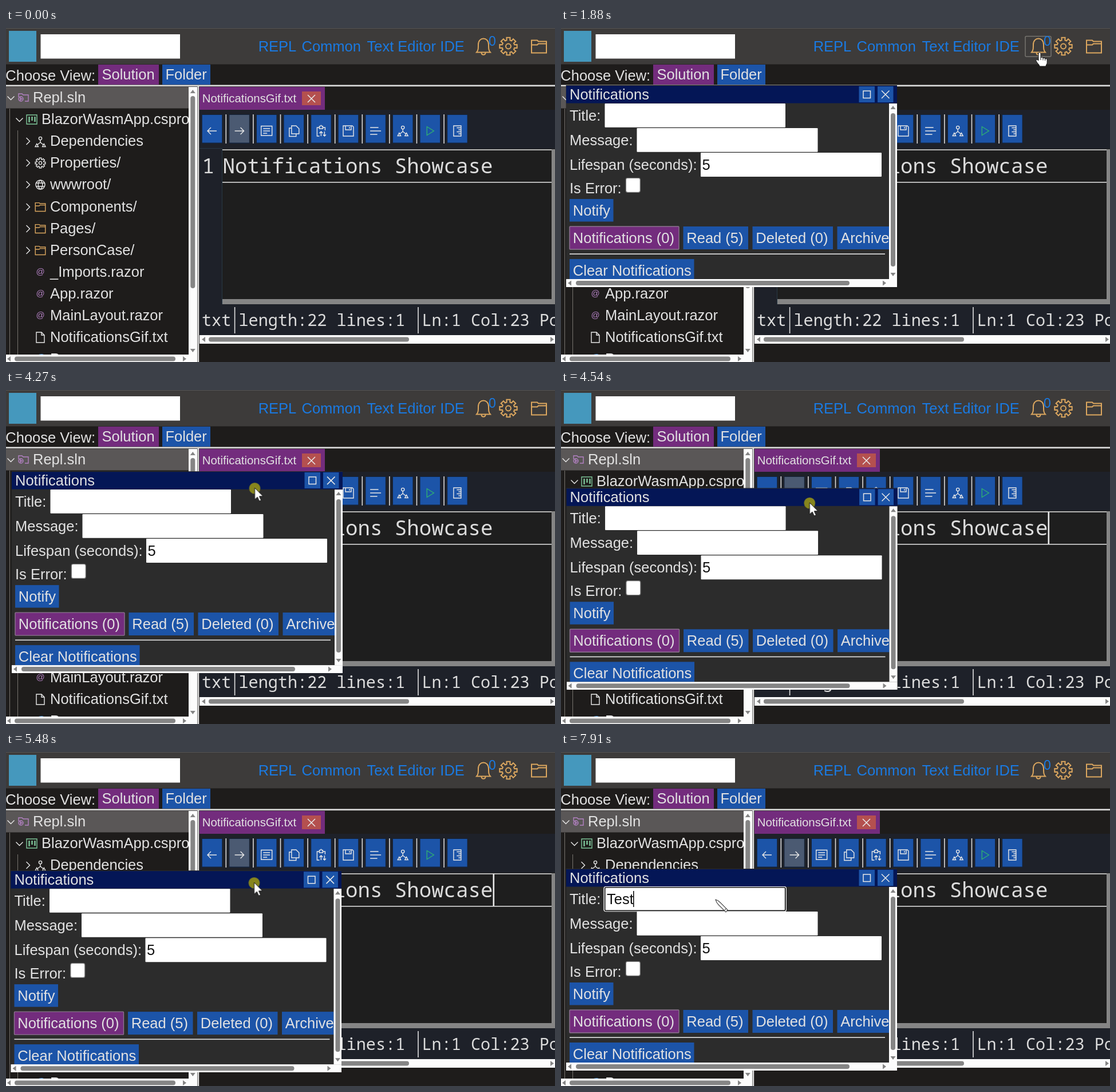
Write an HTML page that moves like this. It is 959 px wide and 584 px high and loops after 8000 ms.

```html
<!DOCTYPE html>
<html lang="en">
<head>
<meta charset="utf-8">
<title>Notifications Showcase</title>
<style>
html, body { margin: 0; width: 100%; height: 100%; overflow: hidden; background: #1e1c1b; }
svg { display: block; width: 100vw; height: 100vh; }
text { font: 25.5px "Liberation Sans", Arial, sans-serif; fill: #e2e2e2; white-space: pre; }
.code { font: 35.75px "Noto Sans Mono", monospace; fill: #dcdcdc; }
.status { font: 28.5px "Noto Sans Mono", monospace; fill: #dcdcdc; }
.link { fill: #1a7ae2; }
.ink { fill: #111; }
.line { fill: none; stroke: #e8e8e8; stroke-width: 1.5; }
.gold { stroke: #dca75f; }

.caret { animation: blink 8s step-end infinite; }
.focus { animation: focus 8s step-end infinite; }
.window { animation: show 8s step-end infinite, drag 8s linear infinite; }
.ring { animation: ring 8s step-end infinite; }
.typing { animation: typing 8s step-end infinite; }
.bar { animation: bar 8s step-end infinite; }
.pointer { animation: move 8s linear infinite; }
.press { animation: press 8s step-end infinite; }
.arrow { animation: arrow 8s step-end infinite; }
.hand { animation: hand 8s step-end infinite; }
.pen { animation: pen 8s step-end infinite; }

@keyframes blink {
  0%, 10.14%, 22.81%, 35.49%, 48.16%, 60.84%, 73.51%, 86.19%, 98.86%, 100% { opacity: 0; }
  3.8%, 16.475%, 29.15%, 41.825%, 54.5%, 67.175%, 79.85%, 92.525% { opacity: 1; }
}
@keyframes focus { 0%, 48.2%, 100% { opacity: 0; } 20% { opacity: 1; } }
@keyframes show { 0% { visibility: hidden; } 22.6%, 100% { visibility: visible; } }
@keyframes drag {
  0%, 48.6% { transform: translate(0, 0); }
  51.6% { transform: translate(0, 20px); }
  53.375% { transform: translate(1px, 42px); }
  61% { transform: translate(0, 108px); }
  61.9%, 64.4% { transform: translate(-1px, 110px); }
  73%, 100% { transform: translate(0, 104px); }
}
@keyframes ring { 0% { opacity: 0; } 79.5%, 100% { opacity: 1; } }
@keyframes typing {
  0% { transform: translate(79px, 0); }
  88.125% { transform: translate(95px, 0); }
  91.375% { transform: translate(107px, 0); }
  92.25% { transform: translate(119.5px, 0); }
  93.125%, 100% { transform: translate(126px, 0); }
}
@keyframes bar { 0% { opacity: 0; } 88.125%, 100% { opacity: 1; } }
@keyframes move {
  0%, .8% { transform: translate(921px, 588px); }
  4% { transform: translate(915px, 425px); }
  7.5% { transform: translate(890px, 235px); }
  10.6% { transform: translate(867px, 134px); }
  14% { transform: translate(848px, 70px); }
  17%, 31.5% { transform: translate(836px, 43px); }
  36% { transform: translate(660px, 92px); }
  41.4% { transform: translate(456px, 122px); }
  44.7%, 48.6% { transform: translate(434.5px, 120px); }
  51.6% { transform: translate(434.5px, 148px); }
  53.375% { transform: translate(434.5px, 171px); }
  61% { transform: translate(434px, 229.5px); }
  61.9%, 64.4% { transform: translate(433px, 231px); }
  73%, 74.5% { transform: translate(434px, 225px); }
  79%, 100% { transform: translate(270px, 258px); }
}
@keyframes press {
  0%, 21.75%, 73%, 81.2%, 100% { opacity: 0; }
  20%, 48.2%, 79.5% { opacity: 1; }
}
@keyframes arrow { 0%, 32.5% { opacity: 1; } 16%, 75.7%, 100% { opacity: 0; } }
@keyframes hand { 0%, 32.5%, 100% { opacity: 0; } 16% { opacity: 1; } }
@keyframes pen { 0% { opacity: 0; } 75.7%, 100% { opacity: 1; } }
</style>
</head>
<body>
<svg viewBox="0 0 959 584" preserveAspectRatio="none">
  <defs>
    <path id="gear"/>
    <path id="folder" d="M-6.5 5.5V-5.5H-1.5L-.5 -4.5H6.5V5.5ZM-6.5 -1.5H-1.5L-.5 -2.5H6.5"/>
    <g id="nodes"><circle cy="-6" r="2.6"/><path d="M0 -3.4V1L-5 5M0 1L5 5M-9 8.5l2.7 -5 2.7 5zM3.6 8.5l2.7 -5 2.7 5z"/></g>
    <clipPath id="treeClip"><path d="M0 103H319V571H0z"/></clipPath>
    <clipPath id="bodyClip"><path d="M9 131H573V439H9z"/></clipPath>
  </defs>

  <rect width="959" height="584" fill="#1e1c1b"/>

  <!-- header -->
  <rect width="959" height="63.5" fill="#3d3b3a"/>
  <rect width="959" height="1" fill="#555"/>
  <rect x="5" y="5" width="48" height="54" fill="#4598bd"/>
  <rect x="60.5" y="11" width="243.5" height="42.5" fill="#fff"/>
  <g class="links">
    <text class="link" x="440.7" y="41">REPL</text>
    <text class="link" x="516.5" y="41">Common</text>
    <text class="link" x="630.5" y="41">Text Editor</text>
    <text class="link" x="758.3" y="41">IDE</text>
  </g>
  <rect class="focus" x="811" y="14.5" width="45" height="35.5" rx="2" fill="none" stroke="#777570" stroke-width="1.5"/>
  <g class="line gold">
    <path stroke-width="2" d="M822 42.5H846C843 39 843 36 843 29C843 15 825 15 825 29C825 36 825 39 822 42.5ZM830.5 43C830.5 48 837.5 48 837.5 43"/>
    <use href="#gear" transform="translate(877.5 32) scale(1.72)" stroke-width="1.15"/>
    <use href="#folder" transform="translate(931 32.5) scale(2)" stroke-width="1"/>
  </g>
  <text class="link" x="843" y="31" style="font-size:23px">0</text>

  <text x="-.7" y="92">Choose View:</text>
  <rect x="161" y="64" width="106" height="35" fill="#732c7d"/>
  <text x="167.5" y="90">Solution</text>
  <rect x="273" y="64" width="84" height="35" fill="#1c54a8"/>
  <text x="278.5" y="90">Folder</text>
  <rect y="99.5" width="959" height="2.7" fill="#dcdcdc"/>

  <!-- tree -->
  <g clip-path="url(#treeClip)">
    <rect y="103" width="319" height="37.5" fill="#5a5757"/>
    <path d="M6.5 141V571M20.5 179V571" stroke="#77736f"/>
    <g id="tree"></g>
  </g>
  <g id="treeBars"></g>
  <rect x="334.5" y="100" width="2.7" height="484" fill="#dcdcdc"/>

  <!-- editor -->
  <rect x="338" y="103" width="219" height="40" fill="#732c7d"/>
  <text x="342.8" y="130" style="font-size:20.4px">NotificationsGif.txt</text>
  <rect x="517" y="111" width="33" height="24" fill="#b4504f"/>
  <path class="line" d="M527 117l13 13m0 -13l-13 13"/>
  <rect x="338" y="143" width="621" height="394" fill="#1e2129"/>
  <g id="tools"></g>
  <rect x="378" y="211" width="581" height="263" fill="#1e1e1e"/>
  <path d="M338 210.5H378M377.5 211V483" stroke="#283945" fill="none"/>
  <path d="M378 213H953M378 269.7H959" stroke="#e6e6e6" stroke-width="1.6"/>
  <rect x="953" y="212" width="6" height="262" fill="#858585"/>
  <rect x="378" y="474" width="581" height="9" fill="#858585"/>
  <text class="code" x="342.5" y="254">1</text>
  <text class="code" x="378.5" y="254">Notifications Showcase</text>
  <rect class="caret" x="850.5" y="213" width="2.6" height="56" fill="#e8e8e8"/>
  <text class="status" x="342" y="521">txt</text>
  <text class="status" x="406.5" y="521">length:22 lines:1</text>
  <text class="status" x="726.5" y="521">Ln:1 Col:23 Pos:22</text>
  <path d="M399.6 488V534M720 488V534" stroke="#e2e2e2" stroke-width="1.6"/>
  <g id="editorBars"></g>

  <!-- dialog -->
  <g class="window">
    <rect x="8.7" y="100" width="578.3" height="353" fill="#2c2c2c"/>
    <rect x="9" y="101" width="578" height="30.5" fill="#041656"/>
    <text x="15" y="124.5">Notifications</text>
    <path d="M520.5 102h27.5v28h-27.5zM553 102h27.5v28h-27.5z" fill="#1c54a8"/>
    <path class="line" d="M528 110h12.5v12.5h-12.5zM560 109.5l13.5 13.5m0 -13.5l-13.5 13.5"/>
    <g clip-path="url(#bodyClip)">
      <text x="15" y="162">Title:</text>
      <text x="15" y="205">Message:</text>
      <text x="15" y="248">Lifespan (seconds):</text>
      <text x="15" y="288.5">Is Error:</text>
      <g fill="#fff">
        <rect x="76.5" y="132" width="315.5" height="41.7" rx="1"/>
        <rect x="132.5" y="175" width="316" height="41.7" rx="1"/>
        <rect x="244" y="218" width="316" height="42" rx="1"/>
        <rect x="113.3" y="262.3" width="25" height="25" rx="3" stroke="#767676" stroke-width="1.3"/>
      </g>
      <text class="ink" x="246.5" y="248">5</text>
      <text class="ink" x="80" y="162">Test</text>
      <g class="typing">
        <rect x="0" y="138" width="52" height="30" fill="#fff"/>
        <rect class="bar" x="0" y="139" width="1.6" height="28" fill="#111"/>
      </g>
      <g class="ring" fill="none">
        <rect x="75.2" y="131.6" width="318" height="43" rx="3" stroke="#fff" stroke-width="1.5"/>
        <rect x="76.7" y="132.8" width="315" height="40.6" rx="2" stroke="#111" stroke-width="1.6"/>
      </g>
      <g id="buttons"></g>
      <rect x="15" y="394.3" width="551" height="1.7" fill="#dcdcdc"/>
    </g>
    <g id="windowBars"></g>
  </g>

  <!-- pointer -->
  <g class="pointer">
    <circle class="press" cy=".7" r="9.8" fill="#86851d"/>
    <path class="arrow" d="M0 0V20.5L4.7 16 8 23.2 11.2 21.8 8 14.8H14.5Z" fill="#fff" stroke="#111"/>
    <g class="hand" stroke="#111" stroke-linejoin="round">
      <path fill="#fff" d="M-2 2C-2 -1 2 -1 2 2V9C3 7.5 6 8 6 10C7 8.7 9.5 9 9.7 11C11 10 13.2 10.6 13.2 13V18C13.2 20 11 21 11 24H0C0 21 -5 18 -6 14.5C-6.5 12 -4 11.5 -2 14Z"/>
      <path fill="none" d="M2 9V13M6 10V13.5M9.7 11V14"/>
    </g>
    <path class="pen" d="M0 0C4 1 6 3 8 5L21 18 18 22 5 9C3 7 1 4 0 0ZM15.5 19.5L18.5 15.5" fill="#fff" stroke="#444" stroke-width="1.1"/>
  </g>
</svg>
<script>
const $ = id => document.getElementById(id);
const fill = (id, parts) => { $(id).innerHTML = parts.join(''); };
const glyph = (x, y, d, color = '#e8e8e8') =>
  `<path d="${d}" transform="translate(${x} ${y})" fill="none" stroke="${color}" stroke-width="1.4"/>`;
const use = (name, x, y, color = '#e8e8e8', scale = 1) =>
  `<use href="#${name}" transform="translate(${x} ${y}) scale(${scale})" fill="none" stroke="${color}" stroke-width="${1.4 / scale}"/>`;

// eight-toothed outline plus a round hub
function gearPath() {
  let d = '';
  for (let i = 0; i < 8; i++) {
    [[-.2, 9], [.2, 9], [.26, 6.4], [.525, 6.4]].forEach(([a, r]) => {
      const t = i * Math.PI / 4 + a;
      d += (d ? 'L' : 'M') + (r * Math.cos(t)).toFixed(2) + ' ' + (r * Math.sin(t)).toFixed(2);
    });
  }
  return d + 'ZM2.6 0A2.6 2.6 0 1 0 -2.6 0A2.6 2.6 0 1 0 2.6 0';
}
$('gear').setAttribute('d', gearPath());

// scrollbar: box, centre line, first arrow, thumb ends, second arrow
function scroll(vertical, [x, y, w, h], c, a, from, to, b) {
  const size = to - from;
  const thumb = vertical
    ? `x="${c - 4}" y="${from}" width="8" height="${size}"`
    : `x="${from}" y="${c - 4}" width="${size}" height="8"`;
  const tip = (p, s) => vertical
    ? `M${c - 4.5} ${p + s * 3}h9l-4.5 ${-s * 6}z`
    : `M${p + s * 3} ${c - 4.5}v9l${-s * 6} -4.5z`;
  return `<rect x="${x}" y="${y}" width="${w}" height="${h}" fill="#fcfcfc"/>` +
    `<rect ${thumb} rx="4" fill="#858585"/><path d="${tip(a, 1)}${tip(b, -1)}" fill="#858585"/>`;
}
fill('treeBars', [
  scroll(true, [319, 103, 15, 481], 326.3, 111, 119, 455, 564),
  scroll(false, [0, 571, 334, 13], 578.5, 5, 15, 296, 312)
]);
fill('editorBars', [scroll(false, [338, 537, 621, 15], 544.5, 345, 354, 704, 954)]);
fill('windowBars', [
  scroll(true, [573, 132, 14, 307], 580, 139, 149, 417, 431),
  scroll(false, [9, 439, 578, 14], 446, 15, 26, 504, 565)
]);

const purple = '#b482c4', gold = '#dca75f', green = '#7fc79b';
const at = (x, y) => `<text x="${x - 7.5}" y="${y + 5}" style="font-size:15px;fill:${purple}">@</text>`;
const dir = (x, y) => use('folder', x, y + 1, gold, 1.35);
const solution = (x, y) => glyph(x, y, 'M-8 0V-6H-2L0 -4H9V7H3M-4 -1A4 4 0 1 0 -4 7A4 4 0 1 0 -4 -1M-5 1l3 2 -3 2z', purple);
const project = (x, y) => glyph(x, y + 1, 'M-9 -8H9V8H-9ZM-4 -5V5M-5 -5V5M0 -5V2M1 -5V2M5 -5V4M6 -5V4', green);
const globe = (x, y) => glyph(x, y + 1, 'M-8 0A8 8 0 1 0 8 0A8 8 0 1 0 -8 0M-7 -3H7M-7 3H7M0 -8C-5 -4 -5 4 0 8C5 4 5 -4 0 -8');
const page = (x, y) => glyph(x, y + 1, 'M-7 -9H2L7 -4V9H-7ZM2 -9V-4H7');
const cs = (x, y) => glyph(x, y + 1, 'M7 -6C4 -10 -7 -9 -7 0C-7 9 4 10 7 6', '#4a94d8');
const rows = [
  ['Repl.sln', solution],
  ['BlazorWasmApp.csproj', project],
  ['Dependencies', (x, y) => use('nodes', x, y + 2)],
  ['Properties/', (x, y) => use('gear', x, y + 1)],
  ['wwwroot/', globe],
  ['Components/', dir],
  ['Pages/', dir],
  ['PersonCase/', dir],
  ['_Imports.razor', at],
  ['App.razor', at],
  ['MainLayout.razor', at],
  ['NotificationsGif.txt', page],
  ['Program.cs', cs]
];
fill('tree', rows.map(([name, icon], i) => {
  const y = Math.round(121 + 38.1 * i), x = 15 * Math.min(i, 2);
  const chevron = i < 2 ? 'M-6 -2.5L0 3.5L6 -2.5' : 'M-3 -6L3 0L-3 6';
  return (i < 8 ? glyph(x + 8.5, y + 1, chevron) : '') + icon(x + 30, y) +
    `<text x="${x + 47}" y="${y + 9}">${name}</text>`;
}));

const tools = [
  'M8 0H-8M-2 -6L-8 0L-2 6',
  'M-8 0H8M2 -6L8 0L2 6',
  'M-9.5 -8.5H9.5V8H-9.5ZM-6 -4H6M-6 0H6M-6 4H1',
  'M-4 -9H4L9 -4V5H-4ZM-4 -5H-8V9.5H4V5',
  'M-3 9H-7V-6H-3M3 -6H7V-1M-3 -4V-8H-1.5C-1.5 -10.5 1.5 -10.5 1.5 -8H3V-4ZM0 9V1M-3 4L0 1L3 4M6 1V9M3.5 6.5L6 9L8.5 6.5',
  'M-9 -9H7L9 -7V9H-9ZM-5 -9V-2H5V-9M2 -7V-4',
  'M-9.5 -6H5M-9.5 0H9.5M-9.5 6H3',
  '',
  'M-5.5 -7.5L6.5 0L-5.5 7.5Z',
  'M-6.5 -9H6.5V9H-6.5ZM-1 -5.5H6.5M2 -2H6.5M-1 1.5H6.5M2 5H6.5'
];
fill('tools', tools.map((d, i) => {
  const x = 342 + 47.6 * i, cx = x + 18;
  const color = i === 8 ? '#2fae74' : '#e8e8e8';
  return `<rect x="${x}" y="151" width="36" height="51" fill="#14233c"/>` +
    `<rect x="${x + .8}" y="152" width="34.4" height="48.5" fill="${i === 1 ? '#4b5a72' : '#1c54a8'}"/>` +
    (d ? glyph(cx, 180, d, color) : use('nodes', cx, 180)) +
    (i < 9 ? `<rect x="${x + 41.5}" y="151" width="1.6" height="51" fill="#dcdcdc"/>` : '');
}));

const buttons = [
  ['Notify', 15, 299, 76.5, 39.5],
  ['Notifications (0)', 15, 347, 191, 40],
  ['Read (5)', 213.5, 347, 113.5, 40],
  ['Deleted (0)', 334.5, 347, 140.5, 40],
  ['Archived (0)', 482.5, 347, 160, 40],
  ['Clear Notifications', 15, 404, 217.5, 40]
];
fill('buttons', buttons.map(([name, x, y, w, h], i) =>
  `<rect x="${x}" y="${y}" width="${w}" height="${h}" fill="${i === 1 ? '#732c7d' : '#1c54a8'}"` +
  (i === 1 ? ' stroke="#8d7590" stroke-width="1.4" rx="1"' : '') + '/>' +
  `<text x="${x + 5.8}" y="${y + 28.7}">${name}</text>`));
</script>
</body>
</html>
```
